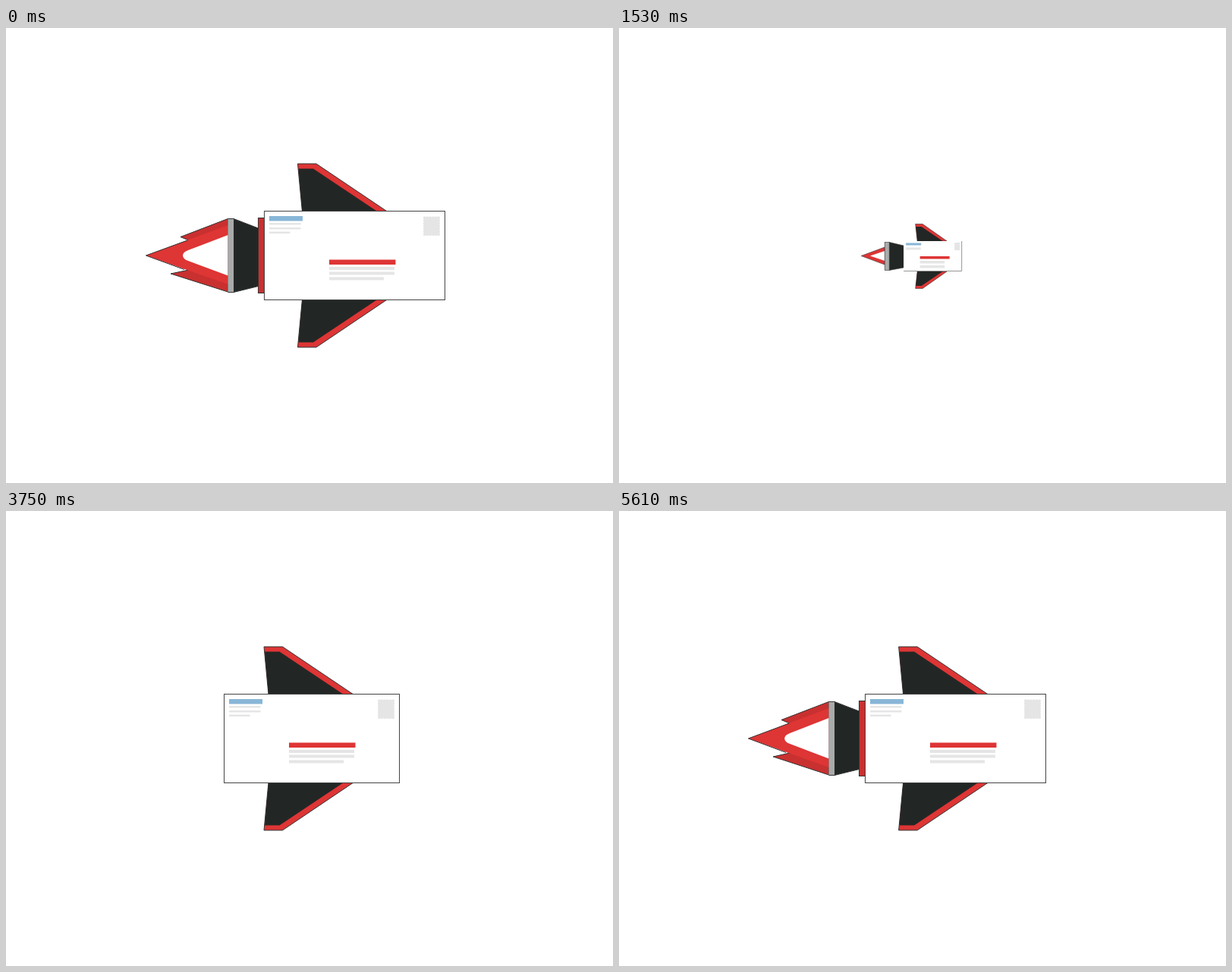
Recreate the animation shown at these times as an HTML page. Size 800 by 600 pixels, loop 5640 ms.

```html
<!DOCTYPE html>
<html lang="en">
<head>
<meta charset="utf-8">
<title>Rocket letter</title>
<style>
html, body { margin: 0; width: 100%; height: 100%; overflow: hidden; background: #fff; }
svg { display: block; width: 800px; height: 600px; }
.red { fill: #de3535; }
.deep { fill: #c93030; }
.dark { fill: #222725; }
.steel { fill: #a9abab; }
.pale { fill: #e5e5e5; }
.blue { fill: #88b6d7; }
.white { fill: #fff; }
.edge { stroke: #333; stroke-width: 1; }
.thin { stroke: #333; stroke-width: .6; }
</style>
</head>
<body>
<svg viewBox="0 0 800 600">
  <defs>
    <g id="wing">
      <path class="red edge" d="M0 179H24.5L118 242H6Z"/>
      <path class="dark" d="M1 185.5H20.5L105 242H6Z"/>
    </g>
    <g id="smallWing">
      <path class="red thin" d="M15.5 258.5H25L57 281H18Z"/>
      <path class="dark" d="M16 262H23.5L51.5 281H18Z"/>
    </g>
  </defs>

  <g id="small">
    <path id="smallFlame" class="red thin"/>
    <path id="smallCore" class="white"/>
    <path class="dark thin" d="M-19 282.5L0 287V316L-19 319.5Z"/>
    <rect class="steel thin" x="-25" y="282.5" width="6" height="37"/>
    <use href="#smallWing"/>
    <use href="#smallWing" transform="matrix(1 0 0 -1 0 602)"/>
    <rect class="white" y="281" width="76.5" height="39.5"/>
    <path d="M0 320.5H76.5V281" fill="none" stroke="#888" stroke-width=".9"/>
    <rect class="blue" x="3" y="283.5" width="20" height="3"/>
    <rect class="pale" x="3" y="289.5" width="19.5" height="3"/>
    <rect class="red" x="21.5" y="301" width="39" height="3.5"/>
    <path class="pale" d="M21.5 307H54v3.5H21.5ZM21.5 313H54v3.5H21.5ZM67 283h7v10h-7Z"/>
  </g>

  <g id="big">
    <g id="engine">
      <path id="spikes" class="deep edge"/>
      <path id="flame" class="red"/>
      <path id="flameEdge" class="edge" fill="none"/>
      <path id="core" class="white"/>
      <path class="dark edge" d="M-40.5 251.5L-8 264V340.5L-40.5 348.5Z"/>
      <rect class="steel" x="-48" y="251.5" width="7.5" height="97"/>
      <path class="edge" fill="none" d="M-48 251.5H-40.5M-48 348.5H-40.5"/>
      <rect class="deep edge" x="-8" y="250.5" width="8" height="99"/>
    </g>
    <use id="topWing" href="#wing"/>
    <use id="lowWing" href="#wing"/>
    <rect id="paper" class="white" y="241.5" height="117" stroke="#444"/>
    <rect class="blue" x="6.5" y="248" width="44" height="6.5"/>
    <path class="pale" d="M6.5 257H48v2.5H6.5ZM6.5 263H48v2.5H6.5ZM6.5 268.5H34v2.5H6.5Z"/>
    <rect class="red" x="85.5" y="305.5" width="87.5" height="6.5"/>
    <path class="pale" d="M85.5 315H171.5v4H85.5ZM85.5 321.5H171.5v4H85.5ZM85.5 328.5H157.5v4H85.5Z"/>
    <g id="stamp">
      <rect class="pale" y="248.5" width="22" height="25.5"/>
      <rect y="248.5" width="22" height="25.5" fill="none" stroke="#fff" stroke-width="1.6" stroke-linecap="round" stroke-dasharray="0 3.65"/>
    </g>
  </g>
</svg>
<script>
const LOOP = 5640, STEP = 30;
const el = id => document.getElementById(id);
const set = (id, name, value) => el(id).setAttribute(name, value);
const move = (id, x, y = 0) => set(id, 'transform', `translate(${x} ${y})`);
const show = (id, on) => set(id, 'visibility', on ? 'visible' : 'hidden');
const clamp = v => Math.min(1, Math.max(0, v));
const span = (t, from, to) => clamp((t - from) / (to - from));
const easeOut = p => 1 - (1 - p) ** 3;
const easeSine = p => (1 - Math.cos(Math.PI * p)) / 2;

// Piecewise linear value through [time, value] pairs
function track(t, keys) {
  let [time, value] = keys[0];
  for (const [nextTime, nextValue] of keys) {
    if (t < nextTime) return time === nextTime ? value : value + (nextValue - value) * span(t, time, nextTime);
    [time, value] = [nextTime, nextValue];
  }
  return value;
}

function drawSmall(t) {
  const on = t >= 780 && t < 2280;
  show('small', on);
  if (!on) return;
  const right = 460 * easeOut(span(t, 750, 1800)) + 490 * span(t, 1860, 2280) ** 3;
  move('small', right - 76.5 - .5);
  const length = track(t, [[1320, 22], [1530, 31], [1890, 29]]);
  set('smallFlame', 'd', `M-25 289L${-25 - length} 300.5L-25 312Z`);
  set('smallCore', 'd', `M-25 294L${-25 - length * .62} 300.5L-25 307Z`);
}

function drawFlame(length) {
  const base = -48;
  const tip = base - length;
  const upper = base - Math.min(62.5, length * .72);
  const lower = base - length * .62 - Math.max(0, length - 87) * .4;
  const core = base - length * .55;
  const grow = clamp(length / 87);
  const bottom = 339 + 9 * span(length, 87, 100);
  set('spikes', 'd', `M${base} 251.5L${upper} 275.5L${upper + 11 * grow} 280V319L${lower} 324L${base} ${bottom}Z`);
  set('flame', 'd', `M${base} 260L${tip} 300L${base} 338Z`);
  const notch = length * .55;
  set('flameEdge', 'd', `M${tip + notch * .92} 280L${tip} 300L${tip + notch * .85} 318.5`);
  const bend = 7 * grow;
  set('core', 'd', `M${base} 273L${core + bend} 293Q${core} 295.5 ${core} 300T${core + bend} 307L${base} 326.5Z`);
}

function drawBig(t) {
  const on = t >= 2670 && t < 5880;
  show('big', on);
  if (!on) return;
  const run = Math.max(0, (t - 5490) / STEP);
  const x = 287.5 + 8 * run + .0132 * run ** 4.28;
  const y = -359 * (1 - easeSine(span(t, 2640, 3330)));
  move('big', x, y);

  const width = track(t, [[5400, 231], [5490, 238]]);
  set('paper', 'width', width);
  move('stamp', width - 28.5);

  const wingX = 52.5 - Math.max(0, t - 3750) * .0045;
  const tuck = 62.5 * (1 - easeOut(span(t, 3300, 3740)));
  move('topWing', wingX, tuck);
  set('lowWing', 'transform', `matrix(1 0 0 -1 ${wingX} ${600 - tuck})`);

  move('engine', 60 * (1 - easeOut(span(t, 3780, 4300))));
  drawFlame(track(t, [[4320, 0], [4350, 15], [4860, 87], [4920, 91],
    [5490, 102], [5520, 114], [5610, 106], [5640, 108]]));
}

function draw(now) {
  const t = Math.floor((now % LOOP) / STEP) * STEP;
  drawSmall(t);
  drawBig(t < 780 ? t + LOOP : t);
}

let start;
function tick(now) {
  start ??= now;
  draw(now - start);
  requestAnimationFrame(tick);
}
draw(0);
requestAnimationFrame(tick);
</script>
</body>
</html>
```
